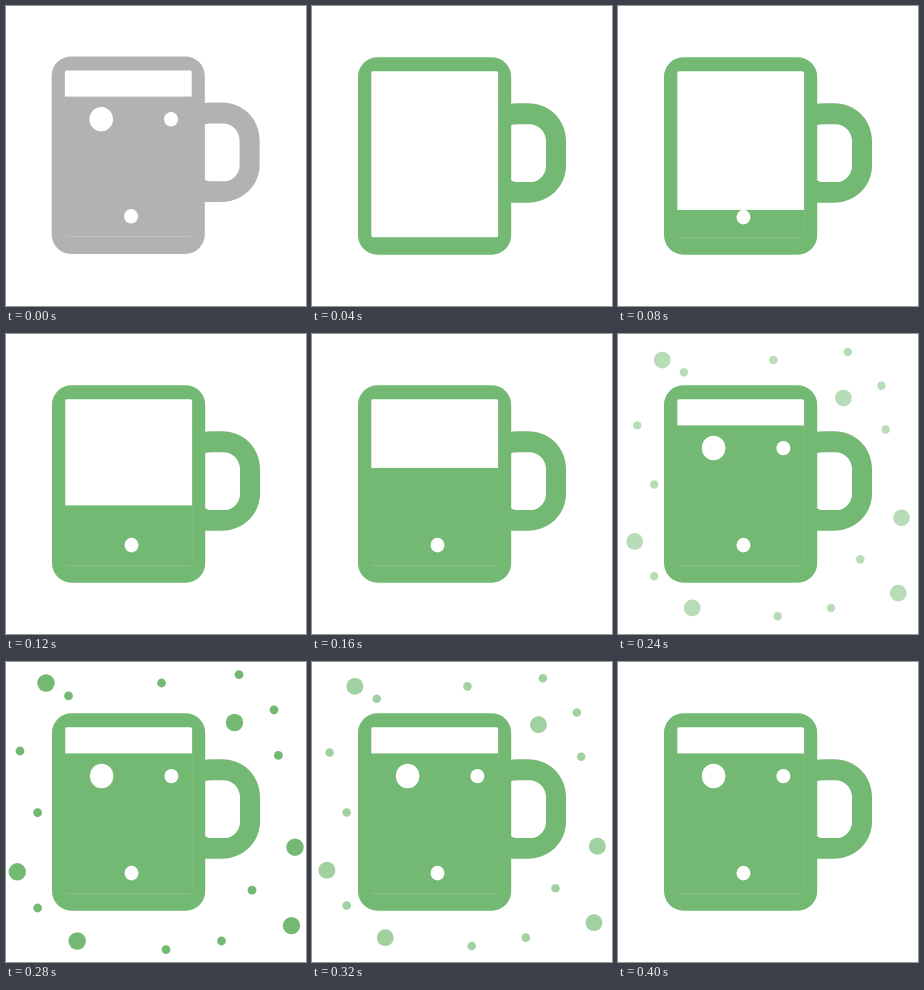
These frames come from a looping animation (300x300 px, 0.52 s). An HTML page:

```html
<!DOCTYPE html>
<html lang="en">
<head>
<meta charset="utf-8">
<title>Filling mug</title>
<style>
  html, body { margin: 0; width: 100%; height: 100%; overflow: hidden; background: #fff; }
  svg { display: block; width: 100vw; height: 100vh; }
</style>
</head>
<body>
<svg viewBox="0 0 300 300">
  <g id="spray" fill="#73b973"></g>
  <g id="mug">
    <path fill-rule="evenodd" d="M198 98 Q201 97.3 205 97.3 H216 C238 97.3 254 114 254 135 V160 C254 180 237 196.8 216 196.8 H198 Z
      M199 119 Q202 118.2 206 118.2 H217 C227 118.2 234 126 234 135 V160 C234 168 227.5 176 219 176 H206 Q201 176 199 174 Z"/>
    <rect x="46" y="51.2" width="153.2" height="197.5" rx="19.5"/>
    <rect x="59.3" y="65.2" width="126.8" height="166" rx="1.6" fill="#fff"/>
    <rect id="drink" x="59" width="127.4"/>
    <g fill="#fff">
      <ellipse cx="95.6" cy="114" rx="11.8" ry="12.2"/>
      <ellipse cx="165.4" cy="114.1" rx="7" ry="7.2"/>
      <ellipse cx="125.5" cy="211.1" rx="7" ry="7.3"/>
    </g>
  </g>
</svg>
<script>
const LOOP = 520, STEP = 40, FLOOR = 231.4;
const BIG = [[40, 21], [228.5, 60.5], [289, 185.2], [285.5, 263.6], [71.2, 279], [11.3, 209.8]];
const SMALL = [[62.5, 33.8], [155.6, 21], [233, 12.7], [268, 47.8], [272.4, 93.3], [246, 228.2],
  [215.5, 279], [160, 287.6], [31.6, 246], [31.6, 150.6], [14, 89]];

const mug = document.getElementById('mug');
const drink = document.getElementById('drink');
const spray = document.getElementById('spray');

function addDots(points, r) {
  for (const [x, y] of points) {
    const dot = document.createElementNS('http://www.w3.org/2000/svg', 'circle');
    dot.setAttribute('cx', x);
    dot.setAttribute('cy', y);
    dot.setAttribute('r', r);
    spray.append(dot);
  }
}

// Drink height rises slightly faster as it fills.
function fillHeight(t) {
  const s = Math.min(Math.max((t - 40) / 160, 0), 1);
  return 100 * s + 40 * s * s;
}

// Spray strength: quick in, slower out.
function sprayLevel(t) {
  if (t <= 200 || t >= 400) return 0;
  return t < 280 ? (t - 200) / 80 : (400 - t) / 120;
}

function draw(time) {
  const t = Math.floor((time % LOOP) / STEP) * STEP;
  const idle = t < STEP;
  const h = idle ? 140 : fillHeight(t);
  mug.setAttribute('fill', idle ? '#b2b2b2' : '#73b973');
  mug.setAttribute('transform', idle ? 'translate(-0.4 -0.8)' : '');
  drink.setAttribute('y', FLOOR - h);
  drink.setAttribute('height', h);

  const level = sprayLevel(t);
  const scale = 1 - 0.078 * (1 - level);
  spray.setAttribute('opacity', level);
  spray.setAttribute('transform', `translate(150 150) scale(${scale}) translate(-150 -150)`);
}

addDots(BIG, 8.7);
addDots(SMALL, 4.4);

const start = performance.now();
function tick() {
  draw(performance.now() - start);
  requestAnimationFrame(tick);
}
tick();
</script>
</body>
</html>
```
